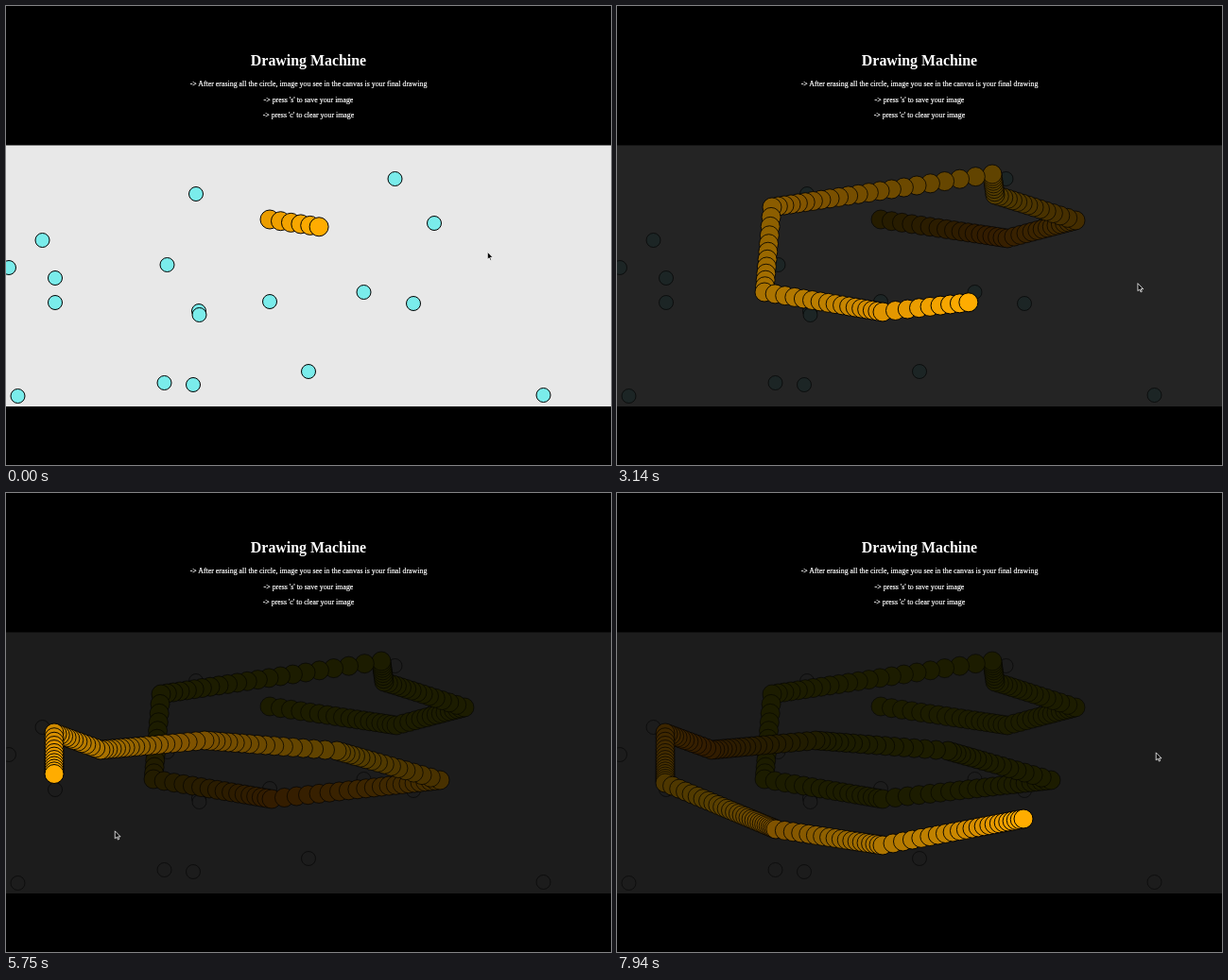
An HTML page with a canvas for the animation above (8 s loop, 640x486 px).

```html
<!DOCTYPE html>
<html lang="en">
<head>
<meta charset="utf-8">
<title>Drawing Machine</title>
<style>
  html, body { margin: 0; width: 100%; height: 100%; overflow: hidden; background: #000; }
  canvas, svg { position: absolute; left: 0; top: 0; width: 640px; height: 486px; }
  text {
    fill: #fff; stroke: #fff; stroke-width: .2px; text-anchor: middle;
    font: 7.88px "Liberation Serif", "Times New Roman", serif;
  }
  .title { font-size: 15.9px; font-weight: bold; stroke: none; }
</style>
</head>
<body>
<canvas id="stage" width="640" height="486"></canvas>
<svg viewBox="0 0 640 486">
  <text class="title" x="320" y="63">Drawing Machine</text>
  <text x="320" y="85">-&gt; After erasing all the circle, image you see in the canvas is your final drawing</text>
  <text x="320" y="101.5">-&gt; press 's' to save your image</text>
  <text x="320" y="118">-&gt; press 'c' to clear your image</text>
  <path id="cursor" d="M0 0V8L1.9 6.4L3.2 9.2L4.4 8.6L3.2 6H5.8Z" fill="#000" stroke="#fff" stroke-width=".8"/>
</svg>
<script>
const LOOP = 8000, STEP = 30, GLIDE = 180;
const PAPER = [232, 232, 232], DOT = [122, 236, 235], BRUSH = [255, 172, 0];

const dots = [
  [411.5, 183], [201, 199], [453, 230], [38.5, 248], [3, 277], [170.5, 274],
  [52, 288], [52, 314], [204, 323], [204.5, 327], [279, 313], [378.5, 303],
  [431, 315], [320, 387], [167.5, 399], [198, 401], [12.5, 413], [568.5, 412]
];

// Where the brush turns: time, x, y
const turns = [
  [-150, 279, 226], [360, 413, 246], [780, 485, 227], [1200, 400, 200], [1440, 397, 178],
  [2070, 164, 213], [2400, 156, 303], [2880, 281, 324], [3510, 459, 304], [3990, 350, 273],
  [4470, 210, 262], [5010, 100, 272], [5370, 51, 254], [5850, 51, 307], [6720, 168, 356],
  [7260, 281, 373], [7920, 430, 345], [8010, 450, 335]
];

const ctx = document.getElementById('stage').getContext('2d');
const cursor = document.getElementById('cursor');

const mix = (a, b, u) => [a[0] + (b[0] - a[0]) * u, a[1] + (b[1] - a[1]) * u];

// The brush covers 5% of the way to the cursor per step.
const chase = time => 1 - .95 ** (time / STEP);

// Each leg aims at the cursor place that makes the brush reach its next turn.
const legs = turns.slice(1).map(([end, ...to], i) => {
  const [start, ...from] = turns[i];
  return { start, end, from, aim: mix(from, to, 1 / chase(end - start)) };
});

const trail = [];
for (const { start, end, from, aim } of legs) {
  for (let born = start; born < end; born += STEP) {
    trail.push({ born, place: mix(from, aim, chase(born - start)) });
  }
}

function cursorAt(time) {
  const i = legs.findIndex(leg => time < leg.end);
  const next = legs[i + 1] || legs[i];
  const u = Math.max(0, 1 - (legs[i].end - time) / GLIDE);
  return mix(legs[i].aim, next.aim, u * u * (3 - 2 * u));
}

// Whole-number fading: every level sticks once its loss rounds to zero.
function fade(level, age) {
  for (let n = Math.floor(age / STEP); n > 0 && level > 28; n--) level -= Math.round(level / 57);
  return level;
}

function paint(color, age) {
  ctx.fillStyle = `rgb(${color.map(level => fade(level, age))})`;
  ctx.strokeStyle = `rgba(0, 0, 0, ${.45 + .55 * Math.exp(-age / 2500)})`;
}

function circle([x, y], radius, color, age) {
  paint(color, age);
  ctx.beginPath();
  ctx.arc(x, y, radius, 0, 2 * Math.PI);
  ctx.fill();
  ctx.stroke();
}

function draw(time) {
  ctx.clearRect(0, 0, 640, 486);
  paint(PAPER, time);
  ctx.fillRect(0, 147.5, 640, 276.5);
  for (const place of dots) circle(place, 7.5, DOT, time);
  for (const { born, place } of trail) {
    if (born <= time) circle(place, 10, BRUSH, time - born);
  }
  cursor.setAttribute('transform', `translate(${cursorAt(time)})`);
}

function tick() {
  draw(performance.now() % LOOP);
  requestAnimationFrame(tick);
}
tick();
</script>
</body>
</html>
```
